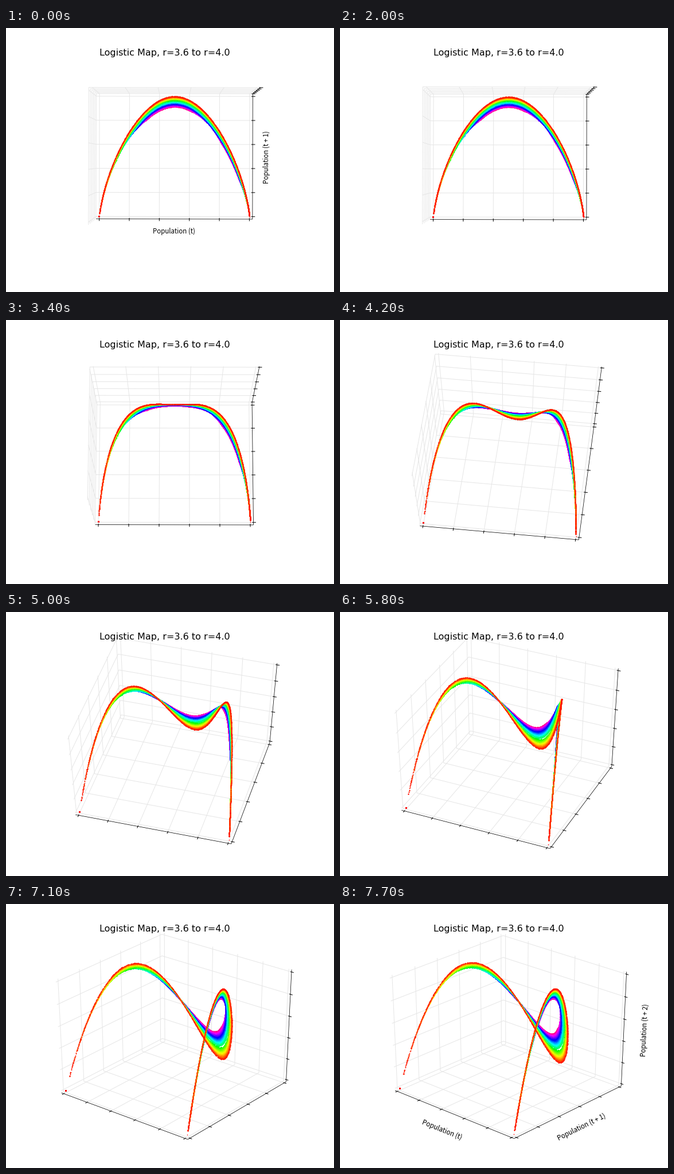
Animation of 572x460 px, one loop 10 s. Source, as a matplotlib script:

```python
import numpy as np
import matplotlib.pyplot as plt
from matplotlib.animation import FuncAnimation
from matplotlib.collections import LineCollection

W, H, DPI = 572, 460, 72
FRAMES, INTERVAL = 100, 100
DIST = 11.0                          # camera distance from the cube centre
SCALE = np.array([558, 446.4]) / 0.185
CENTER = np.array([293.74, 236.43])

RATES = np.linspace(3.6, 4.0, 50)
GENS = 1000
LOW, HIGH = -1 / 48, 1 + 1 / 48      # ends of the axis lines
TICKS = np.linspace(0, 1, 6)
TICK_IN, TICK_OUT = 0.1 / 12, 0.2 / 12

# (first frame, last frame, elevation step, azimuth step)
MOVES = [(20, 22, -0.5, 0), (23, 36, -1.0, 0), (37, 60, -1.5, 1.1),
         (61, 64, -1.0, 1.1), (65, 73, -0.5, 1.1), (74, 76, -0.2, 0.5)]
LABELS_OFF, LABELS_ON = 20, 77


def camera(n):
    elev, azim = 89.9, 270.1
    for first, last, d_elev, d_azim in MOVES:
        steps = min(max(n - first + 1, 0), last - first + 1)
        elev += steps * d_elev
        azim += steps * d_azim
    return np.radians(elev), np.radians(azim)


def project(points, elev, azim):
    """Perspective view of points in the unit cube, in stage pixels."""
    se, ce, sa, ca = np.sin(elev), np.cos(elev), np.sin(azim), np.cos(azim)
    p = np.asarray(points, float) - 0.5
    depth = DIST - p @ [ce * ca, ce * sa, se]
    flat = np.stack([p @ [-sa, ca, 0], p @ [-se * ca, -se * sa, ce]], -1)
    return CENTER + SCALE * flat / depth[..., None]


def orbit(rate):
    """Points (x(t), x(t+1), x(t+2)) of the logistic map."""
    pops = [0.5]
    for _ in range(GENS - 1):
        pops.append(pops[-1] * rate * (1 - pops[-1]))
    return np.column_stack([pops[:-2], pops[1:-1], pops[2:]])


def grid_lines():
    corner = np.array([LOW, HIGH, LOW])
    flipped = np.array([HIGH, LOW, HIGH])
    lines = []
    for axis in range(3):
        for t in TICKS:
            mid = corner.copy()
            mid[axis] = t
            start, end = mid.copy(), mid.copy()
            a, b = (axis + 1) % 3, (axis + 2) % 3
            start[a], end[b] = flipped[a], flipped[b]
            lines.append([start, mid, end])
    return np.array(lines)


def tick_lines():
    lines = []
    for t in TICKS:
        lines.append([[t, LOW + TICK_IN, LOW], [t, LOW - TICK_OUT, LOW]])
        lines.append([[HIGH - TICK_IN, t, LOW], [HIGH + TICK_OUT, t, LOW]])
        lines.append([[HIGH - TICK_IN, HIGH, t], [HIGH + TICK_OUT, HIGH, t]])
    return np.array(lines)


ORBITS = [orbit(r) for r in RATES]
GRID, TICK_MARKS = grid_lines(), tick_lines()
EDGES = np.array([[[LOW, LOW, LOW], [HIGH, LOW, LOW]],
                  [[HIGH, LOW, LOW], [HIGH, HIGH, LOW]],
                  [[HIGH, HIGH, LOW], [HIGH, HIGH, HIGH]]])

fig = plt.figure(figsize=(W / DPI, H / DPI), dpi=DPI, facecolor="white")
ax = fig.add_axes([0, 0, 1, 1])
ax.set(xlim=(0, W), ylim=(0, H))
ax.axis("off")

grid = LineCollection([], colors=[(0.9, 0.9, 0.9)], linewidths=1, zorder=1)
edges = LineCollection([], colors="black", linewidths=0.75, zorder=2)
ticks = LineCollection([], colors="black", linewidths=1, zorder=2)
for lines in (grid, edges, ticks):
    ax.add_collection(lines, autolim=False)

colors = plt.get_cmap("hsv")(np.linspace(0.93, 0, len(RATES)))
clouds = [ax.plot([], [], "o", ms=1.6, mew=0, color=c, zorder=3)[0]
          for c in colors]

ax.text(277, H - 48, "Logistic Map, r=3.6 to r=4.0", family="DejaVu Sans",
        size=16, ha="center", va="baseline", zorder=4)


def axis_labels(n, spots):
    """Labels at the given stage places, each turned along its axis."""
    ends = project(EDGES, *camera(n))
    labels = []
    for i, (x, y) in enumerate(spots):
        dx, dy = ends[i, 1] - ends[i, 0]
        name = "Population (t" + (f" + {i})" if i else ")")
        labels.append(ax.text(x, H - y, name, family="Noto Sans CJK JP",
                              size=11.5, ha="center", va="center", zorder=4,
                              rotation=np.degrees(np.arctan2(dy, dx))))
    return labels


first_labels = axis_labels(0, [(293, 354), (454, 225)])
last_labels = axis_labels(FRAMES, [(178, 394), (421, 389), (532, 220)])


def draw(n):
    view = camera(n)
    for lines, points in ((grid, GRID), (edges, EDGES), (ticks, TICK_MARKS)):
        lines.set_segments(project(points, *view))
    for cloud, points in zip(clouds, ORBITS):
        cloud.set_data(*project(points, *view).T)
    for label in first_labels:
        label.set_visible(n < LABELS_OFF)
    for label in last_labels:
        label.set_visible(n >= LABELS_ON)
    return [grid, edges, ticks, *clouds, *first_labels, *last_labels]


anim = FuncAnimation(fig, draw, frames=FRAMES, interval=INTERVAL,
                     init_func=lambda: draw(0), repeat=True, blit=False)
plt.show()
```
